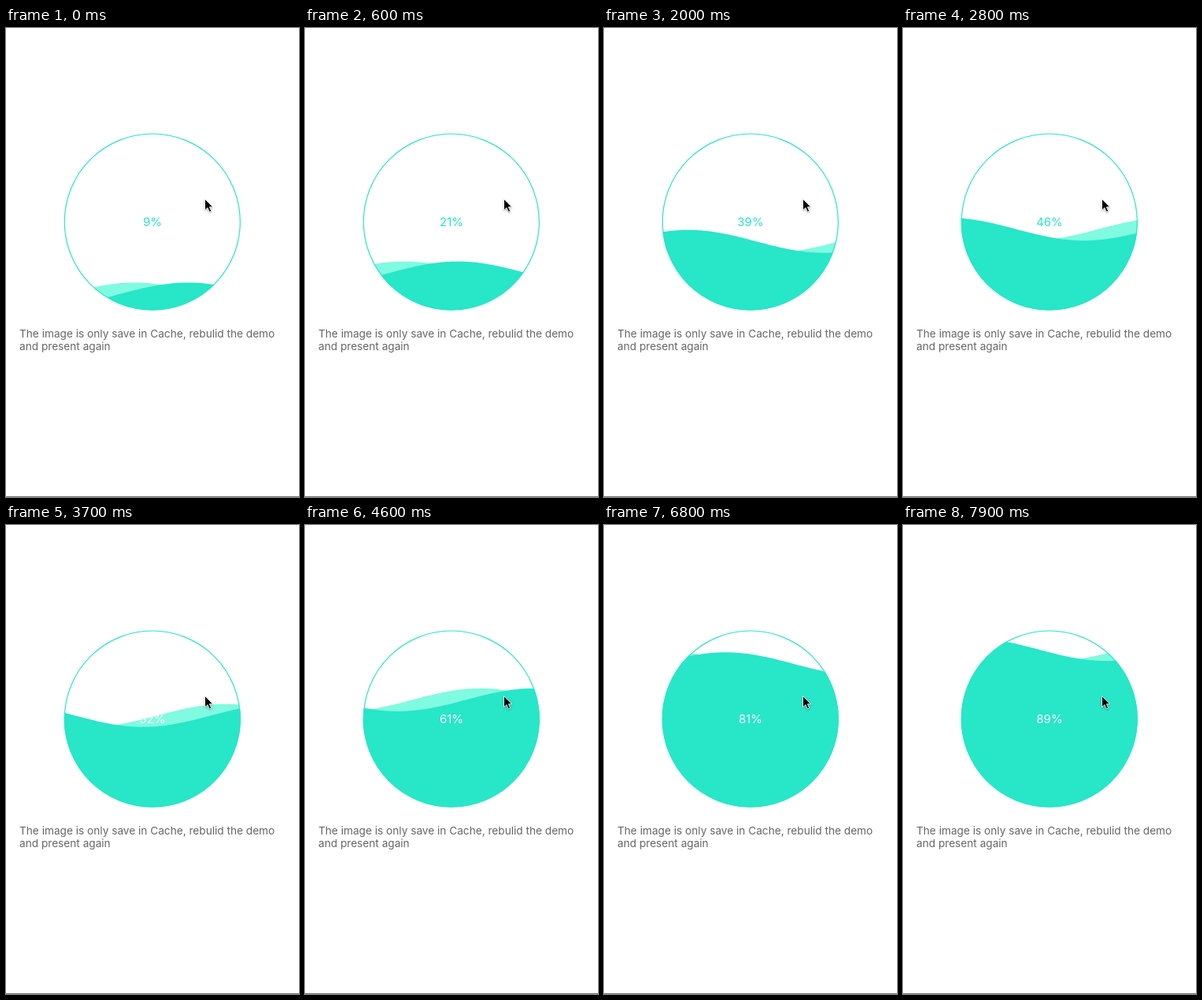
Recreate the animation shown at these times as an HTML page. Size 372 by 594 pixels, loop 8 s.

```html
<!DOCTYPE html>
<html lang="en">
<head>
<meta charset="utf-8">
<style>
  html, body { margin: 0; width: 100%; height: 100%; overflow: hidden; background: #fff; }
  svg { display: block; }
  text { font-family: Inter, Roboto, sans-serif; }
  #label { font-size: 15px; text-anchor: middle; }
  .note { font-size: 13.65px; fill: #666; }
</style>
</head>
<body>
<svg width="372" height="594" viewBox="0 0 372 594">
  <clipPath id="bowl"><circle cx="185.8" cy="245.5" r="112"/></clipPath>
  <g clip-path="url(#bowl)">
    <path id="back" fill="#80fae0"/>
    <path id="front" fill="#28e6c8"/>
  </g>
  <circle cx="185.8" cy="245.5" r="111.5" fill="none" stroke="#28e6c8" stroke-width="1.2"/>
  <text id="label" x="186" y="251"></text>
  <text class="note" x="17" y="391.5">The image is only save in Cache, rebulid the demo</text>
  <text class="note" x="17" y="408">and present again</text>
  <path d="M252.5 216.5v14.3l3.4-3.1 2.4 5.2 2.4-1-2.3-5.1h4.3z" stroke="#fff" stroke-width=".9" stroke-linejoin="round"
    style="filter:drop-shadow(0 1px 1px #0005)"/>
  <path d="M0 593.5H372" stroke="#777"/>
</svg>
<script>
const LOOP = 8000, STEP = 100;
const WAVELENGTH = 346, AMPLITUDE = 14.5, SPEED = 0.0622, HALF_GAP = 34;
// [time in ms, percent loaded]
const progress = [[0, 9], [600, 21], [900, 30.3], [1800, 36.9], [2000, 38.9], [2700, 45.2],
  [3700, 51.9], [4600, 60.8], [5800, 71.1], [6300, 77.1], [7200, 84.6], [7900, 89.4]];
const [back, front, label] = ['back', 'front', 'label'].map(id => document.getElementById(id));

function percentAt(t) {
  const i = Math.max(1, progress.findIndex(([time]) => time >= t));
  const [t0, p0] = progress[i - 1], [t1, p1] = progress[i];
  return p0 + (p1 - p0) * (t - t0) / (t1 - t0);
}

function wave(crest, level) {
  let d = 'M70 360';
  for (let x = 70; x <= 302; x += 2) {
    const y = level - AMPLITUDE * Math.cos((x - crest) * 2 * Math.PI / WAVELENGTH);
    d += `L${x} ${y.toFixed(2)}`;
  }
  return d + 'V360Z';
}

function draw(now) {
  const t = Math.floor(now % LOOP / STEP) * STEP;
  const percent = percentAt(t);
  const level = 357 - percent * 2.23;
  const crest = 197 - SPEED * t;
  back.setAttribute('d', wave(crest - HALF_GAP, level));
  front.setAttribute('d', wave(crest + HALF_GAP, level));
  label.textContent = Math.round(percent) + '%';
  label.setAttribute('fill', percent < 50 ? '#28e6c8' : '#fff');
}

const start = performance.now();
function tick() {
  draw(performance.now() - start);
  requestAnimationFrame(tick);
}
tick();
</script>
</body>
</html>
```
